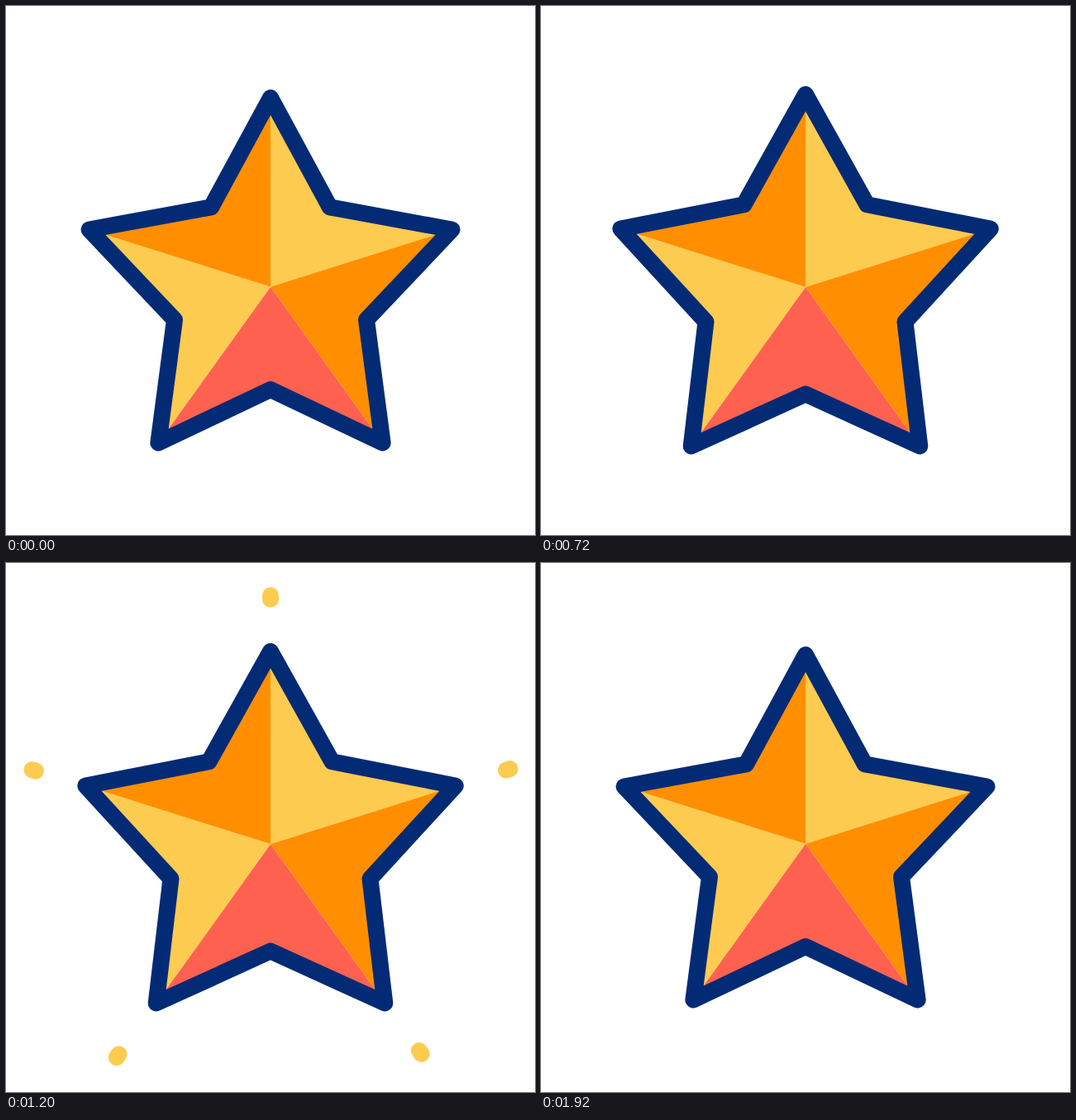
An HTML page that plays this animation: 640x640 px, repeating every 2 s.

```html
<!DOCTYPE html>
<html lang="en">
<head>
<meta charset="utf-8">
<title>Pulsing star</title>
<style>
  html, body { margin: 0; width: 100%; height: 100%; overflow: hidden; background: #fff; }
  svg { display: block; width: 100%; height: 100%; }
</style>
</head>
<body>
<svg viewBox="0 0 640 640">
  <g id="rays" stroke="#fdcb50" stroke-width="20" stroke-linecap="round"></g>
  <g id="facets"></g>
  <path id="outline" fill="none" stroke="#032b75" stroke-width="20" stroke-linejoin="round"/>
</svg>
<script>
const LOOP = 2000, STEP = 40, CX = 320;
const REST = 230.8, SMALL = 200.5, LARGE = 270;
const RAY_LENGTH = 68;
const ORANGE = '#ff8f00', YELLOW = '#fdcb50', PINK = '#ff6150';

// Facets clockwise from the upper right; ray tips clockwise from the top.
const facetColors = [YELLOW, ORANGE, PINK, YELLOW, ORANGE];
const rayTips = [[320, 39.2], [609.5, 249.1], [502.6, 593.8], [133.8, 598.2], [31.5, 250.2]];

const add = (tag, parent) =>
  parent.appendChild(document.createElementNS('http://www.w3.org/2000/svg', tag));
const outline = document.getElementById('outline');
const facets = facetColors.map(color => {
  const facet = add('path', document.getElementById('facets'));
  facet.setAttribute('fill', color);
  return facet;
});
const rays = rayTips.map(([x, y]) => {
  const length = Math.hypot(x - CX, y - 341);
  return { line: add('line', document.getElementById('rays')),
           x, y, dx: (CX - x) / length, dy: (341 - y) / length };
});

const ease = (t, from, to) => {
  const u = Math.min(1, Math.max(0, (t - from) / (to - from)));
  return u * u * (3 - 2 * u);
};
const polar = (cy, radius, turn) => {
  const angle = turn * 2 * Math.PI;
  return [CX + radius * Math.sin(angle), cy - radius * Math.cos(angle)];
};
const polygon = points =>
  'M' + points.map(p => p.map(v => v.toFixed(2)).join()).join('L') + 'Z';

function drawStar(t) {
  const swell = ease(t, 480, 960) - ease(t, 960, 1440);
  const shrink = ease(t, 200, 480) - ease(t, 1440, 1800);
  const radius = REST + (SMALL - REST) * shrink + (LARGE - SMALL) * swell;
  const cy = 341.8 + (radius - REST) * 0.085;
  const apex = [CX, cy - 2.1];

  const points = [];
  for (let i = 0; i < 5; i++) {
    points.push(polar(cy, radius, i / 5));
    points.push(polar(342 + 1.6 * swell, 122 + 9.4 * swell, (i + 0.5) / 5));
  }
  outline.setAttribute('d', polygon(points));
  facets.forEach((facet, i) => {
    const edge = [0, 1, 2].map(k => points[(2 * i + k) % 10]);
    facet.setAttribute('d', polygon([apex, ...edge]));
  });
}

function drawRays(t) {
  const head = RAY_LENGTH * (1 - ease(t, 820, 1070));
  const tail = RAY_LENGTH * (1 - ease(t, 990, 1240));
  for (const { line, x, y, dx, dy } of rays) {
    line.setAttribute('visibility', tail - head > 0.01 ? 'visible' : 'hidden');
    line.setAttribute('x1', x + dx * head);
    line.setAttribute('y1', y + dy * head);
    line.setAttribute('x2', x + dx * tail);
    line.setAttribute('y2', y + dy * tail);
  }
}

const start = performance.now();
function draw() {
  const elapsed = (performance.now() - start) % LOOP;
  const t = Math.floor(elapsed / STEP) * STEP;
  drawStar(t);
  drawRays(t);
  requestAnimationFrame(draw);
}
draw();
</script>
</body>
</html>
```
